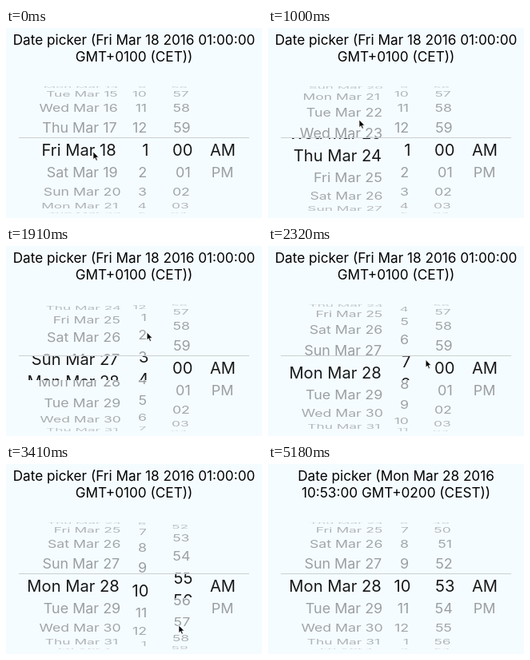
Recreate the animation shown at these times as an HTML page. Size 320 by 238 pixels, loop 5960 ms.

```html
<!DOCTYPE html>
<html lang="en">
<head>
<meta charset="utf-8">
<title>Date picker</title>
<style>
  html, body { margin: 0; width: 100%; height: 100%; overflow: hidden; background: #f5fcff; }
  svg { display: block; width: 320px; height: 238px; font-family: Inter, Roboto, sans-serif; }
  .title { font-size: 17.2px; text-anchor: middle; }
  .wheel { font-size: 18px; }
  .line { stroke: #cbd0d3; stroke-width: 1; }
</style>
</head>
<body>
<svg viewBox="0 0 320 238">
  <defs>
    <clipPath id="outer"><path d="M0 73H320V137.5H0ZM0 168H320V232H0Z"/></clipPath>
    <clipPath id="band"><path d="M0 137.5H320V168H0Z"/></clipPath>
  </defs>
  <text class="title" x="160" y="20.5"></text>
  <text class="title" x="160" y="41.8"></text>
  <g class="wheel" id="far" clip-path="url(#outer)"></g>
  <g class="wheel" id="near" clip-path="url(#band)"></g>
  <path class="line" d="M16 137.5H304"/>
  <g id="cursor">
    <circle id="ring" cx="1" cy="1" r="12.8" fill="none" stroke="#111" stroke-width="1.7"/>
    <path d="M0 0V9.6L2.2 7.6L3.7 11.2L5.3 10.5L3.8 7H6.8Z" fill="#000" stroke="#fff" stroke-width=".7"/>
  </g>
</svg>
<script>
const LOOP = 5960, TITLE_AT = 4750, CURSOR_END = 5180;
const CENTER = 160, MID = 153, RADIUS = 80, STEP = 20.5 * Math.PI / 180;
const SLOTS = 10, ZOOM = 1.12, SNAP = 0.1;
const NS = 'http://www.w3.org/2000/svg', GAP = '\u00a0';
const $ = id => document.getElementById(id);

const DAYS = ['Mon', 'Tue', 'Wed', 'Thu', 'Fri', 'Sat', 'Sun'];
const dateLabel = n => [[DAYS[n % 7], n > 31 ? 'Apr' : 'Mar', ''].join(GAP), String(n > 31 ? n - 31 : n)];
const hourLabel = n => ['', String((n + 11) % 12 + 1)];
const minuteLabel = n => ['', String((n + 60) % 60).padStart(2, '0')];
const halfLabel = n => ['', ['AM', 'PM'][n] || ''];

// x and zoomX anchor the text outside and inside the band;
// each spin is a drag from `press`, then a fling slowing with time constant `tau`
const columns = [
  { label: dateLabel, x: 121, zoomX: 117, align: 'start', from: 18, to: 28, press: 410, drag: 300, tau: 500 },
  { label: hourLabel, x: 176.3, zoomX: 178.5, align: 'end', from: 1, to: 10, press: 1605, drag: 270, tau: 480 },
  { label: minuteLabel, x: 231, zoomX: 233.5, align: 'end', from: 60, to: 53, press: 2765, drag: 330, tau: 430 },
  { label: halfLabel, x: 271, zoomX: 271, align: 'middle', from: 0, to: 0, press: LOOP, drag: 1, tau: 1 }
];

// Cursor stops: time, x, y
const stops = [
  [50, 49, 13], [270, 109, 155], [410, 109, 155], [790, 112, 68], [1000, 114, 115],
  [1560, 177, 168], [1880, 176, 108], [2700, 214, 170], [3060, 216, 202],
  [4770, 216, 202], [CURSOR_END, 184, 240]
];

const titles = [
  ['Date picker (Fri Mar 18 2016 01:00:00', 'GMT+0100 (CET))'],
  ['Date picker (Mon Mar 28 2016', '10:53:00 GMT+0200 (CEST))']
];

// Accelerating drag that joins the fling at equal speed
function spin({ from, to, press, drag, tau }, t) {
  if (t < press) return from;
  const sign = Math.sign(to - from), travel = Math.abs(to - from);
  const fling = (travel + SNAP) / (1 + drag / (2 * tau));
  const u = (t - press) / drag;
  if (u < 1) return from + sign * (travel + SNAP - fling) * u * u;
  const rest = fling * Math.exp(-(t - press - drag) / tau) - SNAP;
  return to - sign * Math.max(0, rest);
}

function cursorAt(t) {
  if (t < stops[0][0]) return [109, 155];
  const i = stops.findIndex(s => s[0] > t);
  if (i < 0) return [0, 0];
  const [t0, x0, y0] = stops[i - 1], [t1, x1, y1] = stops[i];
  const u = (t - t0) / (t1 - t0), e = u * u * (3 - 2 * u);
  return [x0 + (x1 - x0) * e, y0 + (y1 - y0) * e];
}

function addText(parent, anchor) {
  const el = document.createElementNS(NS, 'text');
  el.setAttribute('y', 6.5);
  el.setAttribute('text-anchor', anchor);
  return parent.appendChild(el);
}

function setText(el, text) {
  if (el.textContent !== text) el.textContent = text;
}

const toggle = (el, on) => { el.style.display = on ? '' : 'none'; };

for (const col of columns) {
  col.layers = [['far', 1, col.x], ['near', ZOOM, col.zoomX]].map(([id, zoom, x]) => ({
    zoom, x,
    rows: Array.from({ length: SLOTS }, () => {
      const g = $(id).appendChild(document.createElementNS(NS, 'g'));
      return { g, head: addText(g, 'end'), tail: addText(g, col.align) };
    })
  }));
}

function drawColumn(col, t) {
  const pos = spin(col, t), first = Math.floor(pos) - 4;
  for (const { zoom, x, rows } of col.layers) {
    const near = zoom > 1;
    rows.forEach(({ g, head, tail }, i) => {
      const n = first + i, angle = (n - pos) * STEP, depth = Math.cos(angle);
      const shown = depth > 0.02 && (!near || Math.abs(n - pos) < 1.5);
      toggle(g, shown);
      if (!shown) return;
      const [a, b] = col.label(n);
      setText(head, a);
      setText(tail, b);
      const shrink = near ? 1 : 1 - 0.064 * (1 - depth);
      const left = CENTER + (x - CENTER) * shrink, y = MID + RADIUS * Math.sin(angle);
      g.setAttribute('transform', `translate(${left} ${y}) scale(${shrink * zoom} ${depth * zoom})`);
      g.setAttribute('opacity', near ? 0.9 : 0.38 * depth ** 0.4);
    });
  }
}

function draw(t) {
  const lines = titles[t < TITLE_AT ? 0 : 1];
  document.querySelectorAll('.title').forEach((el, i) => setText(el, lines[i]));
  columns.forEach(col => drawColumn(col, t));
  $('cursor').setAttribute('transform', `translate(${cursorAt(t).join(' ')})`);
  toggle($('cursor'), t < CURSOR_END);
  toggle($('ring'), columns.some(c => t >= c.press && t < c.press + c.drag));
}

const start = performance.now();
function tick() {
  draw((performance.now() - start) % LOOP);
  requestAnimationFrame(tick);
}
tick();
</script>
</body>
</html>
```
